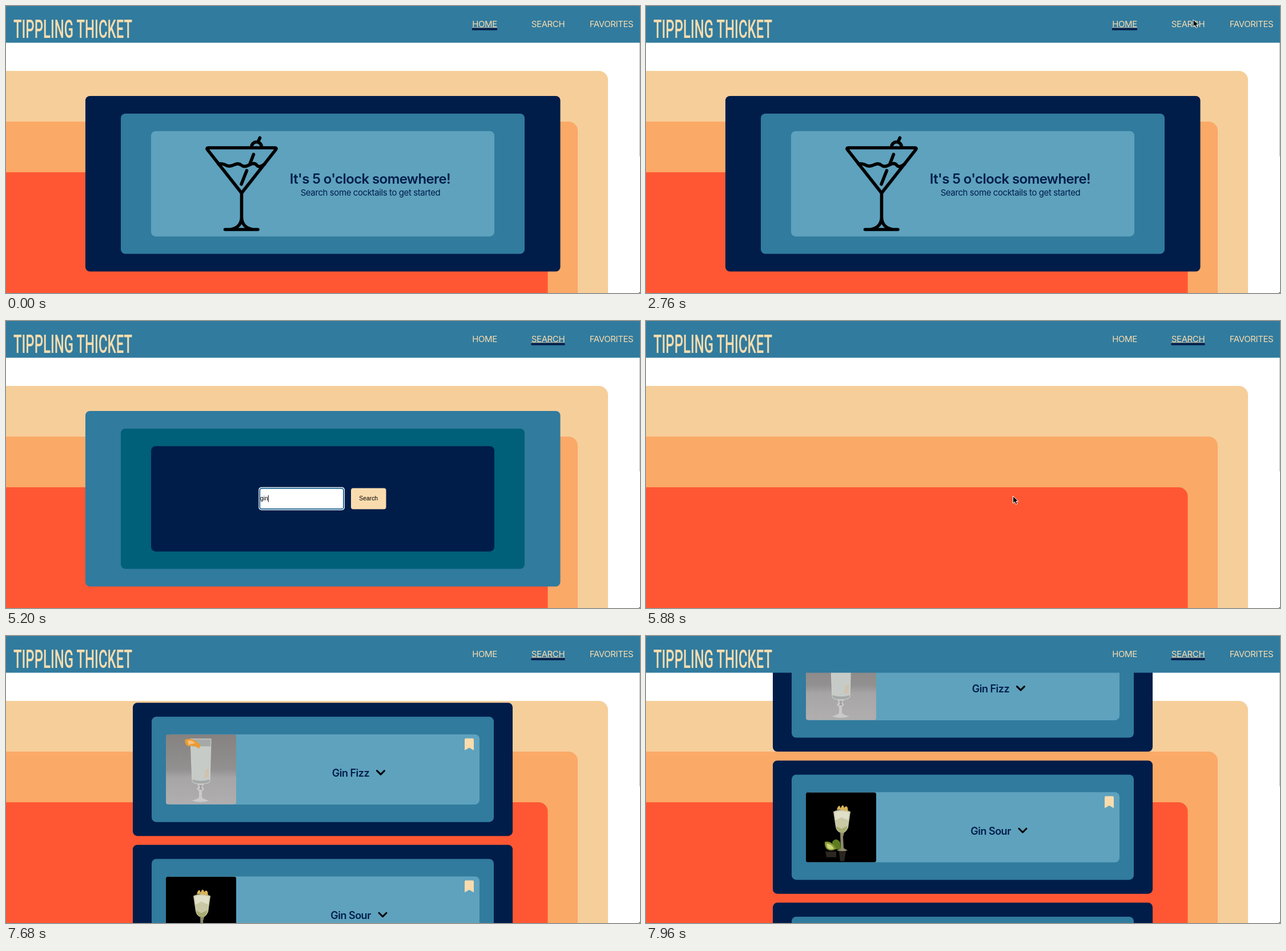
Recreate the animation shown at these times as an HTML page. Size 1110 by 504 pixels, loop 8000 ms.

```html
<!DOCTYPE html>
<html lang="en">
<head>
<meta charset="utf-8">
<title>Cocktail search</title>
<style>
  html, body { margin: 0; width: 100%; height: 100%; overflow: hidden; background: #222; }
  svg { display: block; background: #fff; border-radius: 3px; }
  text { font: 15px Inter, "Open Sans", sans-serif; letter-spacing: -.4px; }
  .mid { text-anchor: middle; }
  .cream { fill: #f9dcae; }
  .navy { fill: #001d4a; }
  .blue { fill: #317b9e; }
  .sky { fill: #5ea2be; }
  .teal { fill: #006079; }
  .brand { font: 500 24px Roboto, sans-serif; letter-spacing: 0; }
  .headline { font-size: 24px; font-weight: 600; letter-spacing: -.6px; }
  .name { font-size: 18px; font-weight: 600; letter-spacing: -.5px; }
  .field { font: 10.35px "Liberation Sans", Arial, sans-serif; letter-spacing: 0; }
  .line { fill: none; stroke: #000; stroke-width: 5.6; stroke-linecap: round; stroke-linejoin: round; }
</style>
</head>
<body>
<svg width="1110" height="504" viewBox="0 0 1110 504">
  <defs>
    <linearGradient id="wall" x2="0" y2="1">
      <stop stop-color="#858281"/><stop offset=".5" stop-color="#929090"/>
      <stop offset=".62" stop-color="#a7a5a5"/><stop offset="1" stop-color="#b0aeae"/>
    </linearGradient>
    <clipPath id="frame"><rect width="123" height="123" rx="4"/></clipPath>

    <g id="fizz" clip-path="url(#frame)">
      <path fill="url(#wall)" d="M0 0H123V123H0z"/>
      <path fill="#a5aaa8" d="M43 8H79L77 82Q75 87 61 87T46 82z"/>
      <path fill="#c6cbc7" d="M44 21H78L77 79Q61 84 46 79z"/>
      <path fill="none" stroke="#d4d6d5" d="M43 8H79L77 82Q75 87 61 87T46 82z"/>
      <path fill="#c9cac9" d="M55 87h12l-3 5 3 4-4 4v10q2 4 13 6-15 6-31 0 11-2 13-6v-10l-4-4 3-4z"/>
      <path fill="#a09e9e" d="M58 89h6l-2 4 2 4h-6l2-4z"/>
      <path fill="#e99b35" d="M33 10Q42 5 51 11L61 19 58 25Q50 18 39 21 33 18 33 10z"/>
      <path fill="#f3c27d" d="M38 11q8-2 13 5-7 0-11 3z"/>
      <path fill="#cfc2ad" d="M69 62l6-2v15l-8 2z"/>
    </g>

    <g id="sour" clip-path="url(#frame)">
      <path d="M0 0H123V123H0z"/>
      <path fill="#c9c8a5" d="M48 34Q62 27 78 34L74 62Q70 71 63 72 54 70 52 61z"/>
      <path fill="#e0dfc8" d="M50 35Q62 31 76 35L74 49 62 44 52 49z"/>
      <path fill="#a9ad72" d="M52 59l10 5 11-5q-3 12-10 12t-11-12z"/>
      <path fill="#d8b45a" d="M54 31q2-8 5-7l2 4q2-7 5-4l1 3q4-5 6 0l1 7q-10-5-20-3z"/>
      <path fill="#8d8a6c" d="M60 71h7l-2 7 1 20 7 4q-9 3-19 0l7-4z"/>
      <path fill="#5e7c21" d="M46 87q7-9 14 1l1 12H48z"/>
      <path fill="#83972e" d="M33 87q12-3 20 12-8 6-16 1-5-5-4-13z"/>
      <path fill="#cbd37b" d="M36 90q9 0 13 9-9 3-12-3z"/>
      <path fill="#2b2722" d="M34 104h19v10H36zM58 104h12l-3 17h-7z"/>
    </g>
  </defs>

  <path fill="#f6ce9a" d="M0 114H1038a16 16 0 0 1 16 16V504H0z"/>
  <path fill="#fba967" d="M0 203H985a16 16 0 0 1 16 16V504H0z"/>
  <path fill="#ff5733" d="M0 292H932.500a16 16 0 0 1 16 16V504H0z"/>
  <path fill="#777" d="M1109.500 64h.5v200h-.5z"/>

  <g id="home">
    <g class="panels" data-fills="navy blue sky"></g>
    <g class="line">
      <path d="M354.500 249H470.500Q474.500 249 472.300 252.300L412.500 328.500 352.700 252.300Q350.500 249 354.500 249z"/>
      <path d="M372 277.500Q379 276 385 279.500T399 279 412 279.500 426 279 439 279.500 453 277.500"/>
      <path d="M430 247.500a8.700 8.700 0 0 1 17.400 0M442 237l2.500-5.500M433.500 260.500l-6.500 17M421.500 289l-9.500 24"/>
      <path d="M412.500 329V371Q412 389 393 392.500H432Q413 389 412.500 371M383.500 392.500H441"/>
    </g>
    <text class="mid navy headline" x="637.500" y="312">It's 5 o'clock somewhere!</text>
    <text class="mid navy" x="638" y="332.500">Search some cocktails to get started</text>
  </g>

  <g id="search">
    <g class="panels" data-fills="blue teal navy"></g>
    <rect x="442.300" y="291.800" width="150.700" height="40.400" rx="5" fill="#fff"/>
    <rect x="444.300" y="293.800" width="146.700" height="36.400" rx="3.500" fill="#fff" stroke="#17618f" stroke-width="1.800"/>
    <text id="query" class="field" x="445" y="315.300"></text>
    <path id="caret" d="M0 306h1v12H0z"/>
    <rect class="cream" x="604" y="293.500" width="61.500" height="37" rx="4"/>
    <text class="mid field" x="634.700" y="315.300">Search</text>
  </g>

  <g id="results"></g>

  <path class="blue" d="M0 0H1110V64.500H0z"/>
  <text class="brand cream" transform="translate(13 55.500) scale(1 1.820)">TIPPLING THICKET</text>
  <g class="mid cream">
    <text x="838" y="37">HOME</text>
    <text x="949" y="37">SEARCH</text>
    <text x="1060" y="37">FAVORITES</text>
  </g>
  <g id="underline">
    <path class="cream" d="M0 37.500h1v1H0z"/>
    <path class="navy" d="M0 38.500h1v4H0z"/>
  </g>
  <path id="cursor" stroke="#fff" stroke-linejoin="round" d="M0 0V12.500L3 9.800 5 14.500 7.500 13.400 5.500 9H9.500z"/>
</svg>

<script>
const LOOP = 8000, STEP = 40;
const PITCH = 249.6;
const $ = id => document.getElementById(id);
const show = (id, on) => $(id).style.display = on ? "" : "none";
const box = (cls, x, y, w, h) =>
  `<rect class="${cls}" x="${x}" y="${y}" width="${w}" height="${h}" rx="8"/>`;

document.querySelectorAll(".panels").forEach(g => {
  const [outer, middle, inner] = g.dataset.fills.split(" ");
  g.innerHTML = box(outer, 139, 158, 831.5, 308.3) + box(middle, 201, 189, 707, 246.3) +
    box(inner, 254, 219.7, 601, 185);
});

// half: half the width of the drink's name
const drinks = [
  { name: "Gin Fizz", photo: "fizz", x: 603.5, half: 32.5 },
  { name: "Gin Sour", photo: "sour", x: 603.5, half: 36 },
  {}
];
$("results").innerHTML = drinks.map(({ name, photo, x, half }, i) => {
  const panels = box("navy", 222, 0, 665, 234) + box("blue", 255, 24.7, 599, 184.8) +
    box("sky", 280, 55.5, 549, 123.3);
  const content = name ? `
    <use id="${photo}Photo" href="#${photo}" x="280" y="55.700"/>
    <path class="cream" d="M805 62.500h12q2 0 2 2V83.500l-8-4.500-8 4.500V64.500q0-2 2-2z"/>
    <text class="mid navy name" x="${x}" y="130">${name}</text>
    <path class="line" style="stroke-width:3" d="M${x + half + 13.500} 119.500l6.500 6.500 6.500-6.500"/>` : "";
  return `<g transform="translate(0 ${144.6 + i * PITCH})">${panels}${content}</g>`;
}).join("");

// [from, x, y]
const stops = [
  [0, -50, 0], [2440, 417, 308], [2480, 988, 7], [2760, 958, 24], [2840, -50, 0],
  [5400, 642.5, 307.5], [7080, -50, 0]
];

function draw(t) {
  const home = t < 2800, searching = !home && t < 5480;
  show("home", home);
  show("search", searching);
  show("results", t >= 6320);
  show("fizzPhoto", t >= 6640);
  show("sourPhoto", t >= 6720);

  $("underline").setAttribute("transform",
    home ? "translate(816 0) scale(44 1)" : "translate(919.500 0) scale(59 1)");

  if (searching) {
    const query = $("query");
    const typed = "gin".slice(0, Math.max(0, Math.floor((t - 5120) / STEP) + 1));
    query.textContent = typed || "Search cocktails here";
    query.setAttribute("fill", typed ? "#000" : "#757575");
    const end = typed ? query.getComputedTextLength() : 0;
    $("caret").setAttribute("transform", `translate(${445 + end} 0)`);
    show("caret", t < 4280 || t >= 4720);
  }

  // accelerating wheel scroll
  const scroll = 175.5 * Math.max(0, (t - 7360) / 600) ** 2.95;
  $("results").setAttribute("transform", `translate(0 ${-scroll})`);

  const [, x, y] = stops.findLast(s => t >= s[0]);
  $("cursor").setAttribute("transform", `translate(${x} ${y})`);
  $("cursor").setAttribute("opacity", t >= 7040 ? .5 : 1);
}

const start = performance.now();
function tick() {
  const t = (performance.now() - start) % LOOP;
  draw(Math.floor(t / STEP) * STEP);
  requestAnimationFrame(tick);
}
tick();
</script>
</body>
</html>
```
